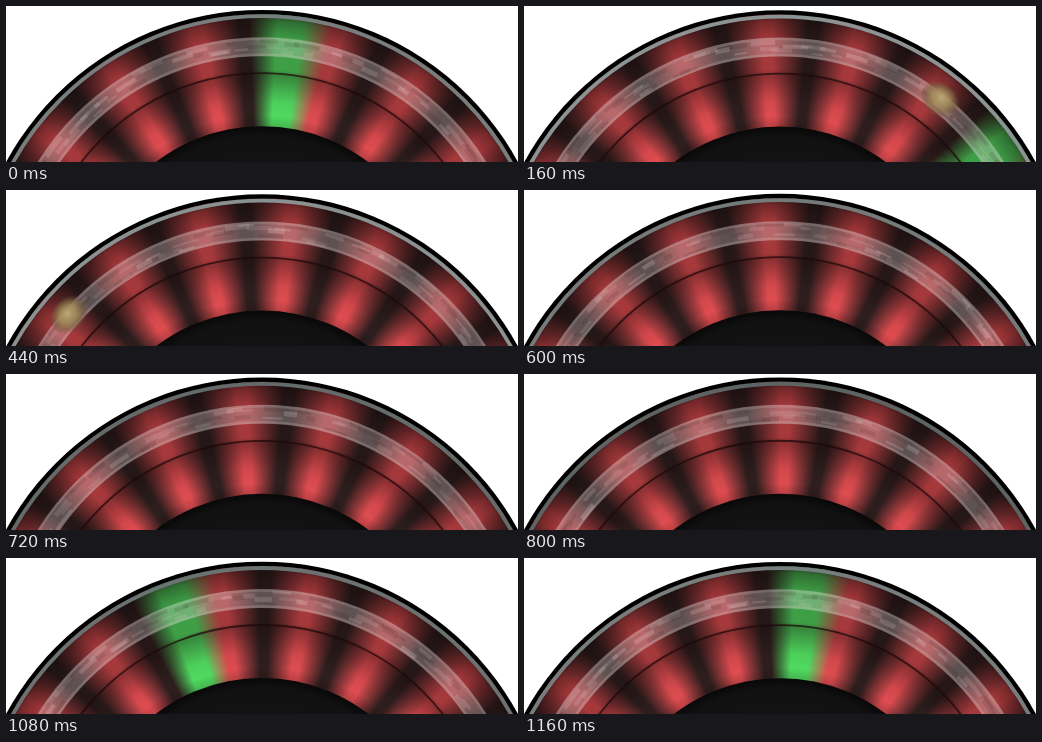
Animation of 512 by 156 pixels, one loop 1200 ms. Source, as an HTML page with a canvas:

```html
<!DOCTYPE html>
<html>
<head>
<meta charset="utf-8">
<style>
html, body { margin: 0; width: 100%; height: 100%; overflow: hidden; background: #fff; }
canvas { display: block; }
</style>
</head>
<body>
<canvas id="stage" width="512" height="156"></canvas>
<script>
const ctx = document.getElementById('stage').getContext('2d');
const TAU = Math.PI * 2, DEG = TAU / 360;
const POCKETS = 37, STEPS = 29, STEP_MS = 40, LOOP_MS = 1200;
const RED = 'rgb(222,76,80)', DARK = 'rgb(46,30,30)', GREEN = 'rgb(80,218,96)';

let seed = 7;
const random = () => (seed = seed * 16807 % 2147483647) / 2147483647;

// Smeared digits on the number band
const smears = Array.from({ length: 150 }, (_, i) => ({
  angle: (i + random()) / 150 * TAU,
  radius: 248 + random() * 13,
  length: (2 + random() * 4) * DEG,
  width: 2 + random() * 3,
  shade: random() < 0.6 ? `rgba(255,240,240,${0.08 + random() * 0.12})` : 'rgba(40,25,25,.12)'
}));

function disc(radius, fill) {
  ctx.fillStyle = fill;
  ctx.beginPath();
  ctx.arc(0, 0, radius, 0, TAU);
  ctx.fill();
}

function ring(radius, width, color, from = 0, to = TAU) {
  ctx.strokeStyle = color;
  ctx.lineWidth = width;
  ctx.beginPath();
  ctx.arc(0, 0, radius, from, to);
  ctx.stroke();
}

function pocketFill(turn) {
  const fill = ctx.createConicGradient(turn - TAU / 4, 0, 0);
  for (let i = 0; i <= POCKETS; i++) {
    const green = i % POCKETS === 0;
    const color = green ? GREEN : i % 2 ? RED : DARK;
    const flat = green ? 0.28 : 0.12;
    for (const side of [-flat, flat]) {
      fill.addColorStop(Math.min(1, Math.max(0, (i + side) / POCKETS)), color);
    }
  }
  return fill;
}

function radialFill(inner, outer, stops) {
  const fill = ctx.createRadialGradient(0, 0, inner, 0, 0, outer);
  for (const [radius, color] of stops) {
    fill.addColorStop((radius - inner) / (outer - inner), color);
  }
  return fill;
}

const shadow = radialFill(170, 290, [
  [170, 'rgba(15,5,5,.25)'], [186, 'rgba(15,5,5,0)'], [200, 'rgba(15,5,5,.06)'],
  [227, 'rgba(15,5,5,.4)'], [232, 'rgba(15,5,5,.28)'], [262, 'rgba(15,5,5,.28)'],
  [280, 'rgba(15,5,5,.5)'], [290, 'rgba(15,5,5,.8)']
]);
const hub = radialFill(100, 175, [[100, '#141414'], [165, '#111'], [175, '#080808']]);

function drawBall(angle) {
  ctx.save();
  ctx.rotate(angle);
  ctx.translate(0, -258);
  ctx.scale(1.25, 1);
  const fill = ctx.createRadialGradient(0, -2, 0, 0, 0, 17);
  fill.addColorStop(0, 'rgba(190,170,120,.95)');
  fill.addColorStop(0.45, 'rgba(158,138,88,.88)');
  fill.addColorStop(0.75, 'rgba(120,102,66,.6)');
  fill.addColorStop(1, 'rgba(95,75,50,0)');
  disc(17, fill);
  ctx.restore();
}

function draw(step) {
  const phase = step / STEPS * TAU, sway = Math.sin(phase);
  const turn = 5.9 * DEG + phase;
  ctx.clearRect(0, 0, 512, 156);
  ctx.save();
  ctx.translate(256, 295.2 + sway * 0.5);

  disc(291.3, '#000');
  disc(287, pocketFill(turn));
  disc(287, shadow);
  ring(285, 3.8, `rgb(${118 + sway * 28},${126 + sway * 28},${126 + sway * 28})`);

  ring(254.5, 19, 'rgba(225,215,215,.3)');
  ring(262.5, 2.5, 'rgba(235,225,225,.15)');
  ring(246.5, 2.5, 'rgba(235,225,225,.18)');
  for (const s of smears) {
    ring(s.radius, s.width, s.shade, s.angle + turn, s.angle + turn + s.length);
  }
  ring(228, 1.8, 'rgba(30,8,10,.75)');
  disc(175, hub);
  drawBall(88 * DEG - phase);
  ctx.restore();
}

function tick(now) {
  draw(Math.floor(now % LOOP_MS / STEP_MS) % STEPS);
  requestAnimationFrame(tick);
}
tick(performance.now());
</script>
</body>
</html>
```
